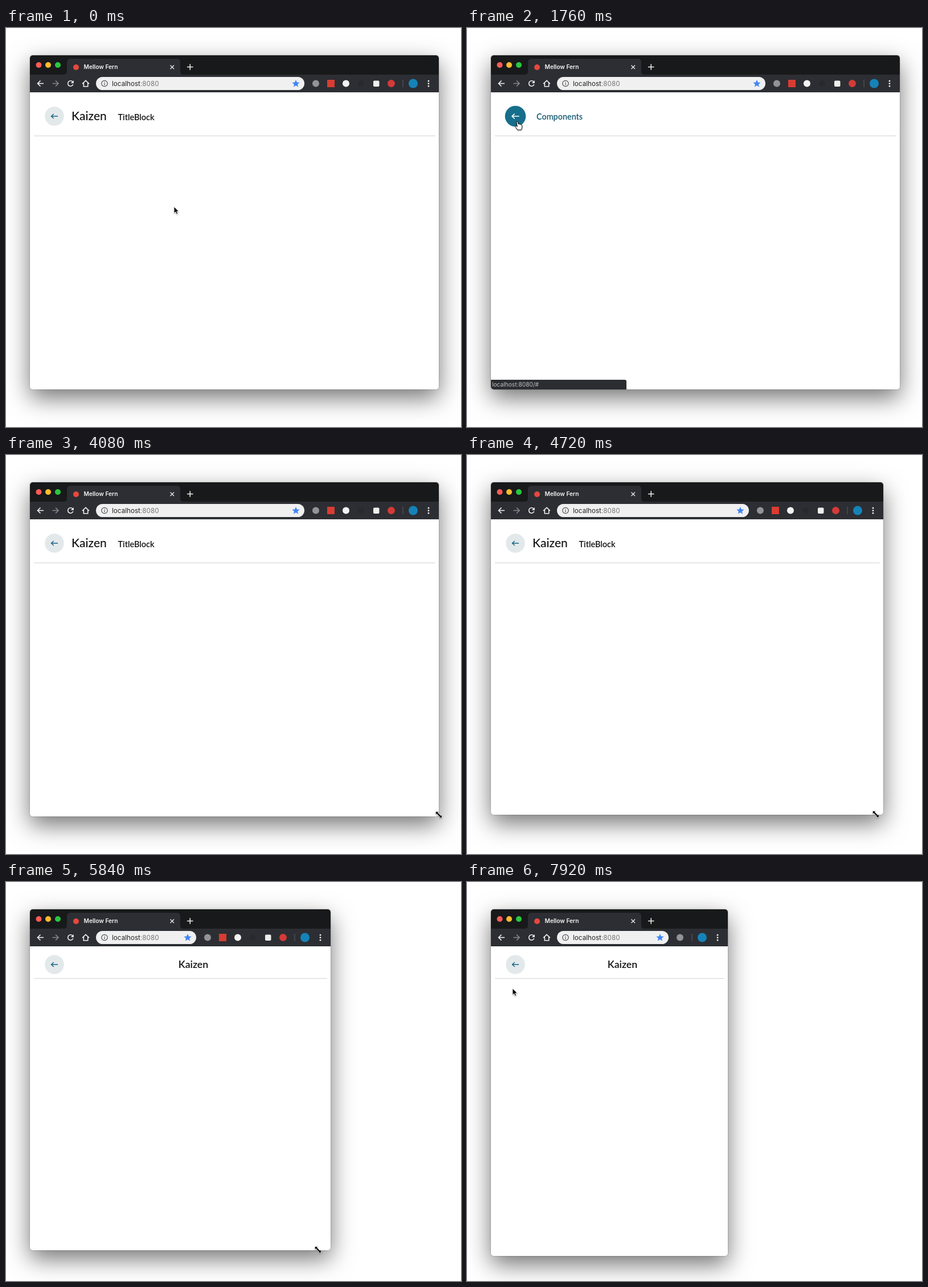
These frames come from a looping animation (799 px wide and 701 px high, 8 s). An HTML page:

```html
<!DOCTYPE html>
<html lang="en">
<head>
<meta charset="utf-8">
<title>Title block</title>
<style>
  html, body { margin: 0; width: 100%; height: 100%; overflow: hidden; background: #fff; }
  svg { position: absolute; width: 799px; height: 701px; }
  #win { position: absolute; left: 42px; top: 48px; overflow: hidden; border-radius: 5px; background: #fff; }
  #win svg { left: -42px; top: -48px; }
  #shadow {
    position: absolute; left: 42px; top: 48px; border-radius: 5px;
    box-shadow: 0 15px 42px rgba(0,0,0,.55), 0 0 1.5px rgba(0,0,0,.6);
  }
  .ui { font: 11.7px Inter, sans-serif; }
  .page { font: 500 21px Lato, sans-serif; fill: #111; }
  .line { fill: none; stroke: #f1f1f2; stroke-width: 1.6; }
</style>
</head>
<body>
<div id="shadow"></div>
<div id="win">
  <svg class="ui">
    <rect x="42" y="48" width="757" height="34" fill="#18191a"/>
    <rect x="42" y="82" width="757" height="31" fill="#2c2e33"/>
    <path d="M101 82q6 0 6-6V60q0-6 6-6H300q6 0 6 6V76q0 6 6 6z" fill="#2c2e33"/>
    <circle cx="57.5" cy="65" r="5" fill="#fc5b57"/>
    <circle cx="74" cy="65" r="5" fill="#fdbc2e"/>
    <circle cx="91" cy="65" r="5" fill="#28c840"/>
    <circle cx="123" cy="69" r="5" fill="#e5483f"/>
    <text x="136.5" y="72" font-size="10.2" font-weight="600" fill="#f4f4f5">Mellow Fern</text>
    <path class="line" d="M288.500 65.500l6.500 6.500m0-6.500l-6.500 6.500" style="stroke-width:1.2"/>
    <path class="line" d="M318 68.500h10.500m-5.250-5.250v10.500" style="stroke-width:1.5"/>

    <path class="line" d="M66 97.500H55.500m5-5l-5 5 5 5"/>
    <path class="line" d="M81.500 97.500H92m-5-5l5 5-5 5" style="stroke:#85878b"/>
    <path class="line" d="M117 94.500a4.700 4.700 0 1 0 .8 4.500"/>
    <path d="M118.800 92v5h-5z" fill="#f1f1f2"/>
    <path class="line" d="M134 98l6-5.700 6 5.700M136.300 96.500v6.200h7.400v-6.200"/>

    <rect id="omnibox" x="158" y="86" height="23" rx="11.500" fill="#f0f0f1"/>
    <g fill="none" stroke="#4c4e52" stroke-width="1.200">
      <circle cx="173" cy="97.500" r="5.200"/>
      <path d="M173 96.700v3.800m0-6v1.200"/>
    </g>
    <text x="186" y="101.500" fill="#222">localhost<tspan fill="#777">:8080</tspan></text>

    <g id="tools">
      <path d="M-251 91l1.900 4.400 4.700.4-3.600 3.100 1.100 4.700-4.100-2.500-4.100 2.500 1.100-4.700-3.600-3.100 4.700-.4z" fill="#4285f4"/>
      <g id="extensions">
        <circle cx="-216" cy="97.500" r="6" fill="#929397"/>
        <rect x="-196" y="91" width="13" height="13" fill="#d93c32"/>
        <circle cx="-163" cy="97.500" r="6" fill="#f3f3f3"/>
        <circle cx="-136.500" cy="97.500" r="5.500" fill="#27292d"/>
        <rect x="-115" y="92.500" width="10.500" height="10.500" rx="2" fill="#eeeeec"/>
        <circle cx="-83.500" cy="97.500" r="6.500" fill="#d43a38"/>
      </g>
    </g>
    <g id="menu">
      <path d="M-63 91v13" stroke="#5b5d61"/>
      <circle cx="-45" cy="97.500" r="8" fill="#1583b8"/>
      <g fill="#f1f1f2">
        <circle cx="-18" cy="93.200" r="1.400"/><circle cx="-18" cy="97.700" r="1.400"/><circle cx="-18" cy="102.200" r="1.400"/>
      </g>
    </g>

    <path id="rule" stroke="#dedfe0" stroke-width="1.300"/>
    <g class="page">
      <g id="back">
        <circle id="disc"/>
        <path id="arrow" d="M6 0H-5.500m4.300-4l-4.300 4 4.300 4" fill="none" stroke-width="1.400"/>
      </g>
      <g id="wide">
        <text x="115" y="162">Kaizen</text>
        <text x="196.500" y="162" font-size="14.500" font-weight="600">TitleBlock</text>
      </g>
      <text id="crumb" y="160.500" font-size="14.400" font-weight="600" fill="#15586f">Components</text>
      <text id="compact" y="151" font-size="17.700" font-weight="600" text-anchor="middle">Kaizen</text>
    </g>
    <g id="status">
      <path d="M42 618H277q3 0 3 3V640H42z" fill="#2b2d31"/>
      <text x="44" y="630" font-size="10.200" fill="#c0c1c3">localhost:8080/#</text>
    </g>
  </svg>
</div>
<svg>
  <defs><filter id="soft" x="-50%" y="-50%" width="200%" height="200%">
    <feDropShadow dx="0" dy="1" stdDeviation=".8" flood-opacity=".35"/>
  </filter></defs>
  <g id="cursor" filter="url(#soft)">
    <path id="pointer" d="M0 0V11.500L2.700 9 4.600 13.300 6.600 12.400 4.800 8.200H8.300z" fill="#000" stroke="#fff" stroke-width=".8"/>
    <path id="hand" d="M-1.200 .8Q0-.8 1.200 .8L2.300 5 3.500 4.600 4.700 5.300 5.900 5 7 5.900Q8.700 6 8.700 8V11L7.500 15H.8L-3 9.500Q-3.500 7.500-1.800 7.800L.3 9.300z" fill="#fff" stroke="#111" stroke-width="1"/>
    <path id="resize" d="M-5.500-5.500H0L-1.800-3.700 3.700 1.800 5.500 0V5.500H0L1.800 3.700-3.700-1.800-5.500 0z" fill="#000" stroke="#fff" stroke-width=".7"/>
  </g>
</svg>
<script>
const LOOP = 8000, SLOT = 26.4;
const $ = id => document.getElementById(id);
const attr = (id, values) => { for (const k in values) $(id).setAttribute(k, values[k]); };
const show = (id, on) => { $(id).style.display = on ? '' : 'none'; };
const ramp = (t, from, to) => Math.min(1, Math.max(0, (t - from) / (to - from)));
const ease = u => u * u * (3 - 2 * u);
const mix = (a, b, u) => a + (b - a) * u;
const blend = (a, b, u) => `rgb(${a.map((v, i) => Math.round(mix(v, b[i], u)))})`;

// Keys are [time, x, y].
const cursorPath = [
  [0, 295, 314], [880, 352, 255], [1400, 88, 164], [1960, 88, 164],
  [2640, 296, 330], [2880, 462, 476], [3240, 690, 600], [3520, 752, 624],
  [3700, 760, 632], [4340, 760, 632], [4720, 718, 631], [5200, 631, 638],
  [5840, 548, 646], [6320, 478, 651], [6640, 456, 655], [7200, 456, 655],
  [7840, 157, 201], [7920, 80, 187]
];
const cornerPath = [
  [4340, 760, 635], [4460, 758, 634], [4720, 731, 632], [5200, 650, 639],
  [5840, 570, 647], [6320, 488, 654], [6740, 458, 656.5]
];

function along(path, t) {
  const i = path.findIndex(key => key[0] > t);
  if (i === 0) return path[0].slice(1);
  if (i < 0) return path[path.length - 1].slice(1);
  const [a, b] = [path[i - 1], path[i]], u = ramp(t, a[0], b[0]);
  return [mix(a[1], b[1], u), mix(a[2], b[2], u)];
}

function draw(t) {
  const [right, bottom] = along(cornerPath, t).map(Math.round);
  for (const id of ['win', 'shadow']) {
    $(id).style.width = right - 42 + 'px';
    $(id).style.height = bottom - 48 + 'px';
  }

  // Extensions drop out to keep the address field at its minimum width.
  const hidden = Math.ceil(Math.max(0, 566 - right) / SLOT);
  const toolsX = right + hidden * SLOT;
  attr('omnibox', { width: toolsX - 236 - 158 });
  attr('tools', { transform: `translate(${toolsX})` });
  attr('menu', { transform: `translate(${right})` });
  [...$('extensions').children].forEach((icon, i) => {
    icon.style.display = i < 6 - hidden ? '' : 'none';
  });

  const narrow = right < 681;
  const hover = ease(ramp(t, 1370, 1620) - ramp(t, 2010, 2260));
  attr('rule', { d: `M49 ${narrow ? 169.5 : 189.5}H${right - 6}` });
  attr('back', { transform: `translate(85 ${narrow ? 145 : 155})` });
  attr('disc', { r: mix(16.8, 18.3, hover), fill: blend([227, 233, 235], [23, 110, 140], hover) });
  attr('arrow', { stroke: blend([23, 100, 130], [255, 255, 255], hover), transform: `scale(${mix(1, 1.1, hover)})` });
  show('wide', !narrow);
  show('compact', narrow);
  attr('wide', { opacity: ramp(hover, .5, 0), transform: `translate(${10 * hover})` });
  attr('crumb', { opacity: ramp(hover, .5, 1), x: mix(112, 122, hover) });
  attr('compact', { x: right / 2 + 44 });
  attr('status', { opacity: ramp(t, 1440, 1560) - ramp(t, 2300, 2520) });

  const [x, y] = along(cursorPath, t);
  const overButton = t > 1370 && t < 2010, resizing = t > 3600 && t < 7230;
  attr('cursor', { transform: `translate(${x} ${y})` });
  show('hand', overButton);
  show('resize', resizing);
  show('pointer', !overButton && !resizing);
}

function tick() {
  draw(performance.now() % LOOP);
  requestAnimationFrame(tick);
}
tick();
</script>
</body>
</html>
```
